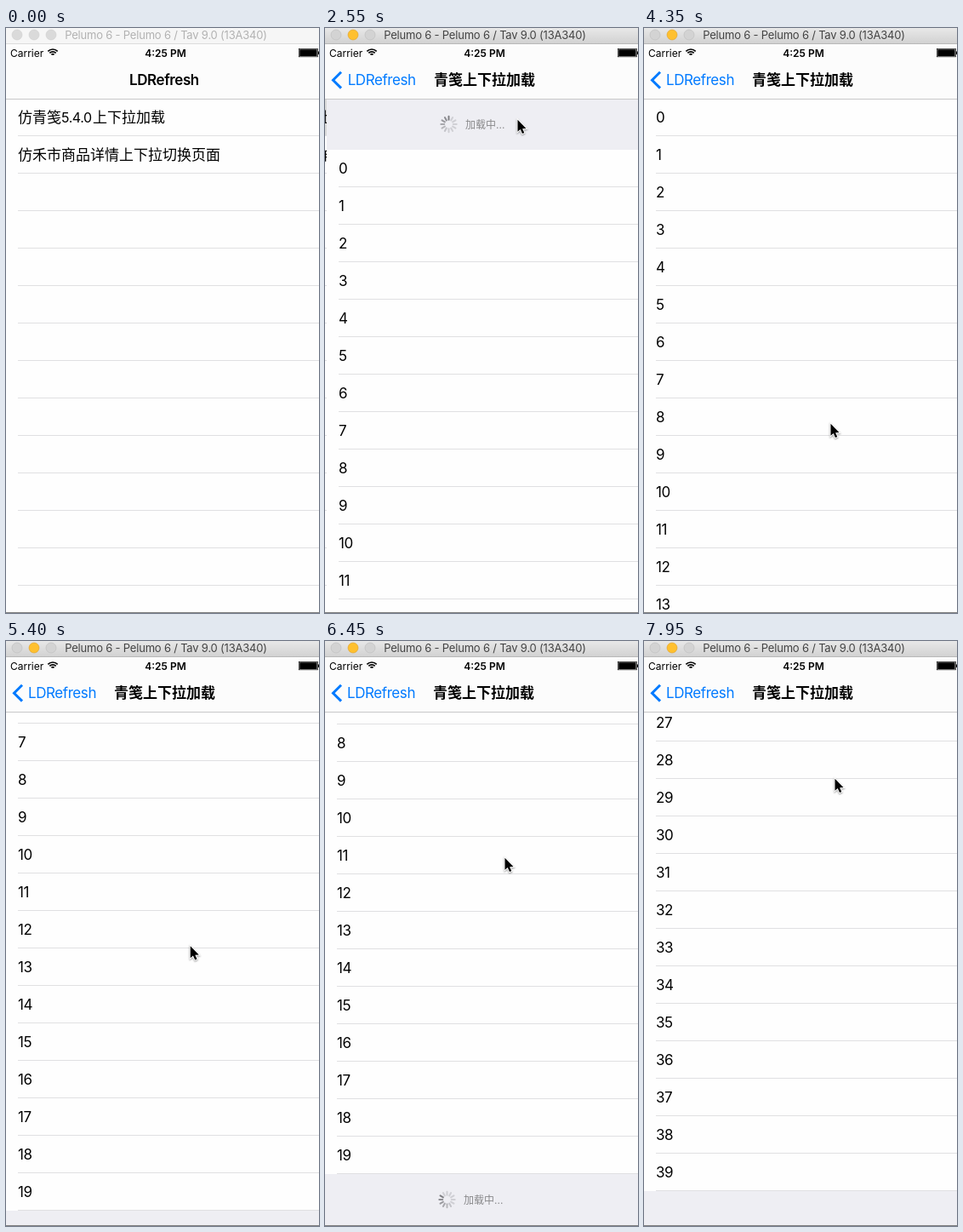
Animation of 368x687 px, one loop 8 s. Source, as an HTML page with a canvas:

```html
<!DOCTYPE html>
<html lang="zh">
<head>
<meta charset="utf-8">
<style>
  html, body { margin: 0; width: 100%; height: 100%; overflow: hidden; background: #fff; }
  canvas { display: block; }
</style>
</head>
<body>
<canvas id="stage" width="368" height="687"></canvas>
<script>
const ctx = document.getElementById('stage').getContext('2d');
const W = 368, H = 687, TOP = 83, ROW = 44, LOOP = 8000, STEP = 150;
const BLUE = '#007aff', LINE = '#e0e0e2', PAPER = '#fefefe';

// Keys are [time, ...values]; a repeated value is a hold.
const cursorKeys = [
  [750, 351, 168], [900, 310, 124], [1200, 310, 124], [1350, 262, 112], [1500, 226, 107],
  [3900, 226, 107], [4350, 219, 464], [4500, 219, 464], [4950, 214, 250], [5100, 214, 250],
  [5250, 218, 392], [5850, 211, 254], [6900, 211, 254], [7350, 152, 620], [7650, 224, 161]
];
const scrollKeys = [
  [3300, -60], [3600, 0], [4500, 0], [4950, 214], [5100, 260], [5250, 277], [5850, 346],
  [6000, 337], [7350, 337], [7500, 640], [7650, 1210], [7800, 1230], [7950, 1197]
];
const pushKeys = [[2250, W], [2400, 70], [2550, 2], [2700, 0]];

function track(keys, t) {
  const i = keys.findIndex(k => k[0] > t);
  if (i === 0) return keys[0].slice(1);
  if (i < 0) return keys[keys.length - 1].slice(1);
  const a = keys[i - 1], b = keys[i], p = (t - a[0]) / (b[0] - a[0]);
  return a.slice(1).map((v, j) => v + (b[j + 1] - v) * p);
}

function box(x, y, w, h, color) {
  ctx.fillStyle = color;
  ctx.fillRect(x, y, w, h);
}

function text(s, x, y, { size = 17, weight = 400, color = '#000', align = 'left', gap = 0, alpha = 1 } = {}) {
  ctx.font = `${weight} ${size}px Inter, "Noto Sans CJK SC", "Noto Sans CJK", sans-serif`;
  ctx.letterSpacing = gap + 'px';
  ctx.textAlign = align;
  ctx.fillStyle = color;
  ctx.globalAlpha = alpha;
  ctx.fillText(s, x, y);
  ctx.globalAlpha = 1;
}

function disc(x, y, r, fill, edge) {
  ctx.beginPath();
  ctx.arc(x, y, r, 0, 7);
  ctx.fillStyle = fill;
  ctx.fill();
  ctx.strokeStyle = edge;
  ctx.lineWidth = 0.6;
  ctx.stroke();
}

function windowBar(active) {
  const g = ctx.createLinearGradient(0, 0, 0, 18);
  g.addColorStop(0, active ? '#e8e8e8' : '#f6f6f6');
  g.addColorStop(1, active ? '#d2d2d2' : '#f6f6f6');
  box(0, 0, W, 18, g);
  box(0, 18, W, 1, active ? '#b8b8b8' : '#dcdcdc');
  const off = active ? '#d3d3d3' : '#dadada', edge = active ? '#bcbcbc' : '#cfcfcf';
  disc(13, 8, 6, off, edge);
  disc(33, 8, 6, active ? '#ffc02f' : off, active ? '#e0a028' : edge);
  disc(53, 8, 6, off, edge);
  text('Pelumo 6 - Pelumo 6 / Tav 9.0 (13A340)', 188, 13,
    { size: 13, color: active ? '#444' : '#b2b2b2', align: 'center', gap: -0.2 });
}

function statusBar() {
  text('Carrier', 5, 34, { size: 12 });
  text('4:25 PM', 187.5, 34, { size: 12, weight: 600, align: 'center' });
  ctx.strokeStyle = '#000';
  ctx.lineWidth = 1.7;
  for (const r of [8, 5.2, 2.2]) {
    ctx.beginPath();
    ctx.arc(55, 33, r, -Math.PI * 0.75, -Math.PI * 0.25);
    ctx.stroke();
  }
  ctx.lineWidth = 0.7;
  ctx.strokeRect(344.4, 24.4, 22, 9.4);
  box(345.2, 25.2, 20.4, 7.8, '#000');
  box(367, 27.5, 1, 3.5, '#000');
}

function navBar(push) {
  const p = 1 - push / W;
  box(0, 19, W, TOP - 19, '#fcfcfc');
  box(0, TOP, W, 1, '#c8c8c9');
  statusBar();
  const x = 145 - 119 * p, gap = -0.42;
  if (p < 1) text('LDRefresh', x, 67, { weight: 600, gap, alpha: (1 - p) ** 2 });
  if (!p) return;
  text('LDRefresh', x, 67, { color: BLUE, gap, alpha: p });
  text('青笺上下拉加载', 186.5 + push / 2, 67, { weight: 600, align: 'center', alpha: p });
  ctx.globalAlpha = p;
  ctx.strokeStyle = BLUE;
  ctx.lineWidth = 3;
  ctx.beginPath();
  ctx.moveTo(19, 51.8);
  ctx.lineTo(9.5, 61.2);
  ctx.lineTo(19, 70.6);
  ctx.stroke();
  ctx.globalAlpha = 1;
}

function home(x, pressed) {
  box(0, TOP, W, H - TOP, PAPER);
  if (pressed) box(0, TOP, W, ROW, '#d9d9d9');
  for (let y = TOP + ROW - 1; y < H; y += ROW) box(x + 14, y, W, 1, LINE);
  text('仿青笺', x + 14, 111);
  text('5.4.0', x + 65, 111, { size: 16, gap: -0.4 });
  text('上下拉加载', x + 102, 111);
  text('仿禾市商品详情上下拉切换页面', x + 14, 155);
}

function loader(x, y, t) {
  const head = Math.floor((t - 2550) / (1000 / 12));
  ctx.lineWidth = 2;
  ctx.lineCap = 'round';
  for (let i = 0; i < 12; i++) {
    const a = i * Math.PI / 6 - Math.PI / 2, c = Math.cos(a), s = Math.sin(a);
    const age = ((head - i) % 12 + 12) % 12;
    ctx.strokeStyle = `rgba(115,115,120,${Math.max(0.25, 0.9 - age * 0.11)})`;
    ctx.beginPath();
    ctx.moveTo(x + 143.5 + c * 5.3, y + s * 5.3);
    ctx.lineTo(x + 143.5 + c * 9.2, y + s * 9.2);
    ctx.stroke();
  }
  ctx.lineCap = 'butt';
  text('加载中...', x + 163, y + 4.5, { size: 12, color: '#88888a' });
}

function list(x, t) {
  const off = Math.round(track(scrollKeys, t)[0]);
  const count = t < 6900 ? 20 : 40;
  const start = TOP - off, end = start + count * ROW;
  box(x, TOP, W, H - TOP, '#eeeef3');
  box(x, start, W, end - start, PAPER);
  for (let i = 0; i < count; i++) {
    const y = start + i * ROW;
    if (y < 0 || y > H) continue;
    text(String(i), x + 14, y + 28, { gap: -0.41 });
    box(x + 14, y + ROW - 1, W, 1, LINE);
  }
  if (off < 0) loader(x, start - 30, t);
  if (t >= 5800 && t < 6900) loader(x, end + 30, t);
}

function pointer(x, y) {
  const pts = [[0, 0], [0, 14], [3.2, 11.2], [5.5, 16.2], [7.8, 15.2], [5.6, 10.4], [10, 10.2]];
  ctx.beginPath();
  for (const [dx, dy] of pts) ctx.lineTo(x + dx + 0.5, y + dy + 0.8);
  ctx.closePath();
  ctx.strokeStyle = '#fff';
  ctx.lineWidth = 2;
  ctx.shadowColor = 'rgba(0,0,0,.4)';
  ctx.shadowBlur = 2;
  ctx.shadowOffsetY = 1;
  ctx.stroke();
  ctx.shadowColor = 'transparent';
  ctx.fillStyle = '#000';
  ctx.fill();
}

function draw(t) {
  const push = Math.round(track(pushKeys, t)[0]);
  if (push) home(-(W - push) * 0.3, t >= 2250);
  if (push < W) list(push, t);
  navBar(push);
  windowBar(t >= 2100);
  box(0, H - 1, W, 1, '#808080');
  if (t >= 750) pointer(...track(cursorKeys, t));
}

function frame() {
  const t = performance.now() % LOOP;
  draw(Math.floor(t / STEP) * STEP);
  requestAnimationFrame(frame);
}
frame();
</script>
</body>
</html>
```
